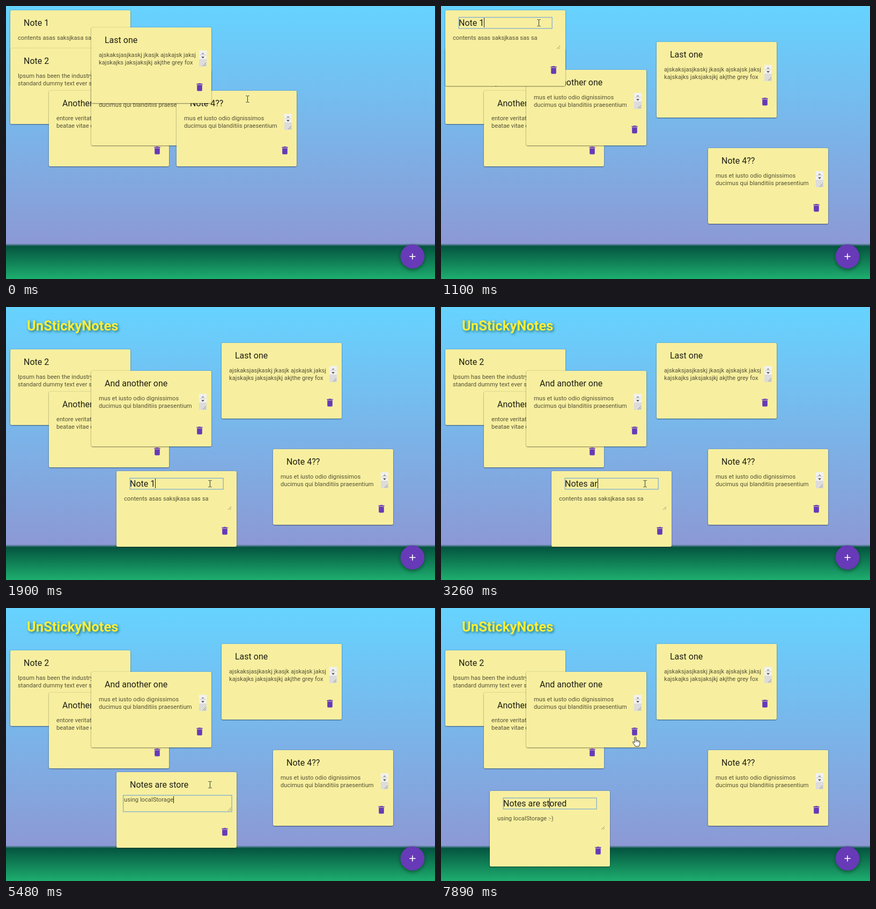
An HTML page with a canvas for the animation above (7990 ms loop, 800 by 509 pixels).

```html
<!DOCTYPE html>
<html lang="en">
<head>
<meta charset="utf-8">
<title>Sticky notes</title>
<style>
html, body { margin: 0; width: 100%; height: 100%; overflow: hidden; }
canvas { display: block; width: 800px; height: 509px; }
</style>
</head>
<body>
<canvas id="stage" width="800" height="509"></canvas>
<script>
const ctx = document.getElementById('stage').getContext('2d');
const LOOP = 7990, W = 224, H = 141;
const PURPLE = '#673ab7', PAPER = '#f7ef9f';
const TITLE_FONT = '16px Roboto, sans-serif';
const BODY_FONT = '11.2px Roboto, sans-serif';
const BIN = new Path2D('M6 19c0 1.1.9 2 2 2h8c1.1 0 2-.9 2-2V7H6v12zM19 4h-3.5l-1-1h-5l-1 1H5v2h14V4z');
const ARROW = new Path2D('M0 0V16L3.7 12.5L6.2 18L8.6 17L6.2 11.6H11.3Z');
const HAND = new Path2D('M4 1.4C4 .1 6.6.1 6.6 1.4V6.6C7.2 5.9 9 6.1 9.1 7.3C9.8 6.6 11.4 6.9 11.5 8.1C12.5 7.5 13.8 8 13.8 9.2V12.5C13.8 14.4 12.4 15.4 12.2 18H5.3C5 16 2.4 13.6.9 11.1C.1 9.6 1.6 8.8 2.5 9.7L4 11.2Z');

// Latest entry whose time has come.
function held(keys, t) {
  let value = keys[0][1];
  for (const [time, v] of keys) if (time <= t) value = v;
  return value;
}

// Eased position between [time, x, y] keys.
function glide(keys, t) {
  let a = keys[0];
  for (const b of keys) {
    if (b[0] > t) {
      if (b === a) break;
      const p = (t - a[0]) / (b[0] - a[0]), e = p * p * (3 - 2 * p);
      return [a[1] + (b[1] - a[1]) * e, a[2] + (b[2] - a[2]) * e];
    }
    a = b;
  }
  return [a[1], a[2]];
}

const typing = (text, start, lengths) =>
  lengths.map((n, i) => [start + i * 100, text.slice(0, n)]);

const HEADING = 'Notes are stored', MESSAGE = 'using localStorage :-)';

const first = {
  path: [[1100, 8, 8], [1600, 202, 309], [1700, 206, 306], [7090, 206, 306], [7490, 88, 349], [7590, 91, 341]],
  title: [
    [0, 'Note 1'], [2100, 'Note '], [2200, 'Note'], [2300, 'Not'], [2420, 'No'], [2520, 'N'],
    ...typing(HEADING, 2720, [2, 3, 4, 5]),
    ...typing(HEADING, 3160, [7, 8, 9, 11]),
    ...typing(HEADING, 3660, [12, 13, 15]),
    [6090, HEADING]
  ],
  body: [
    [0, 'contents asas saksjkasa sas sa'],
    ...typing(MESSAGE, 4380, [1, 3, 5, 7, 9, 11, 12, 14]),
    ...typing(MESSAGE, 5280, [15, 16, 18]),
    ...typing(MESSAGE, 6590, [20, 21, 22])
  ],
  raised: 1100
};

const fixed = (path, title, body, raised) =>
  ({ path, title: [[0, title]], body: [[0, body]], raised, scroll: true });

const fourth = fixed([[0, 318, 158], [300, 507, 274], [400, 498, 265]],
  'Note 4??', 'mus et iusto odio dignissimos\nducimus qui blanditiis praesentium', 100);
const last = fixed([[500, 159, 40], [800, 402, 67]],
  'Last one', 'ajskaksjasjkaskj jkasjk ajskajsk jaksj\nkajskajks jaksjaksjkj akjthe grey fox', 500);
const notes = [
  first,
  fixed([[0, 8, 79]], 'Note 2', 'Ipsum has been the industry\'s\nstandard dummy text ever since'),
  fixed([[0, 80, 158]], 'Another one', 'entore veritatis et quasi architecto\nbeatae vitae dicta sunt explicabo'),
  fixed([[0, 159, 119]], 'And another one', 'mus et iusto odio dignissimos\nducimus qui blanditiis praesentium'),
  fourth,
  last
];

const focus = [
  [0, {}],
  [100, { note: fourth, field: 'title' }],
  [500, { note: last, field: 'title' }],
  [1100, { note: first, field: 'title' }],
  [4030, { note: first, field: 'body' }],
  [5990, { note: first, field: 'title' }],
  [6190, { note: first, field: 'body' }],
  [7090, { note: first, field: 'title' }]
];

const pointer = [
  [0, 450, 173], [300, 639, 289], [400, 630, 280], [500, 310, 62], [800, 553, 89],
  [1100, 182, 31], [1600, 376, 332], [1700, 380, 329], [6090, 380, 329], [6290, 342, 362],
  [6990, 342, 362], [7090, 319, 329], [7490, 201, 372], [7590, 204, 364], [7790, 346, 244], [7890, 364, 249]
];
const pointerKind = [[0, 'beam'], [900, 'arrow'], [1100, 'beam'], [7690, 'arrow'], [7890, 'hand']];

function rect(x, y, w, h, color) {
  ctx.fillStyle = color;
  ctx.fillRect(x, y, w, h);
}

function text(str, x, y, font, color) {
  ctx.font = font;
  ctx.fillStyle = color;
  ctx.fillText(str, x, y);
}

function widthOf(str, font) {
  ctx.font = font;
  return ctx.measureText(str).width;
}

function shadow(color, blur, dx, dy) {
  ctx.shadowColor = color;
  ctx.shadowBlur = blur;
  ctx.shadowOffsetX = dx;
  ctx.shadowOffsetY = dy;
}
const noShadow = () => shadow('transparent', 0, 0, 0);

function line(color, width, ...points) {
  ctx.strokeStyle = color;
  ctx.lineWidth = width;
  ctx.beginPath();
  for (let i = 0; i < points.length; i += 4) {
    ctx.moveTo(points[i], points[i + 1]);
    ctx.lineTo(points[i + 2], points[i + 3]);
  }
  ctx.stroke();
}

function triangle(x, y, dy, color) {
  ctx.fillStyle = color;
  ctx.beginPath();
  ctx.moveTo(x - 3, y);
  ctx.lineTo(x + 3, y);
  ctx.lineTo(x, y + dy);
  ctx.fill();
}

function background() {
  const g = ctx.createLinearGradient(0, 0, 0, 509);
  g.addColorStop(0, '#66d3ff');
  g.addColorStop(0.87, '#8c99d5');
  g.addColorStop(0.88, '#04553f');
  g.addColorStop(1, '#1eae6f');
  rect(0, 0, 800, 509, g);

  shadow('rgba(0,80,60,.75)', 5, 2, 2);
  text('UnStickyNotes', 39, 44, 'bold 25.6px Roboto, sans-serif', '#ffee3a');
  noShadow();
}

function addButton() {
  shadow('rgba(0,0,0,.4)', 7, 0, 3);
  ctx.fillStyle = PURPLE;
  ctx.beginPath();
  ctx.arc(758, 467, 22.4, 0, 7);
  ctx.fill();
  noShadow();
  rect(752.4, 466.2, 11.2, 1.6, '#fff');
  rect(757.2, 461.4, 1.6, 11.2, '#fff');
}

function paper() {
  ctx.fillStyle = PAPER;
  ctx.beginPath();
  ctx.roundRect(0, 0, W, H, 3);
  shadow('rgba(0,0,0,.45)', 2, 0, 1);
  ctx.fill();
  shadow('rgba(0,0,0,.25)', 2, 0, 0);
  ctx.fill();
  noShadow();
}

function scroller() {
  rect(201, 43, 14, 16, '#f1f1f1');
  rect(201, 59, 14, 14, '#dcdcdc');
  triangle(208, 50, -3, '#999');
  rect(202, 51, 12, 1, '#d0d0d0');
  triangle(208, 54.5, 3, '#444');
}

function outline(x, y, w, h) {
  ctx.strokeStyle = '#78a9d2';
  ctx.lineWidth = 1.2;
  ctx.strokeRect(x, y, w, h);
}

function caret(x, y, h) {
  rect(x, y, 1, h, '#222');
}

function drawNote(note, t, q) {
  const [x, y] = glide(note.path, q);
  const title = held(note.title, t), body = held(note.body, t);
  const active = held(focus, t);
  const field = active.note === note ? active.field : '';
  const selected = note === first && t >= 4180 && t < 4380;

  ctx.save();
  ctx.translate(Math.round(x), Math.round(y));
  paper();
  text(title, 25, 29, TITLE_FONT, 'rgba(0,0,0,.88)');
  if (selected) rect(14, 44, widthOf(body, BODY_FONT), 14, '#3390ff');
  body.split('\n').forEach((row, i) =>
    text(row, 14, 55 + i * 13.5, BODY_FONT, selected ? '#fff' : 'rgba(0,0,0,.66)'));

  if (note.scroll) scroller();
  line('#86836a', 0.9, 208, 72, 214, 66, 211.5, 72, 214, 69.5);

  if (field === 'title') {
    outline(25.2, 13.2, 174, 20.6);
    const before = t >= 7090 ? 'Notes are st' : title;
    caret(Math.round(25 + widthOf(before, TITLE_FONT)), 14, 18);
  }
  if (field === 'body') {
    outline(12.7, 43.2, 202.4, 30.6);
    const blink = t >= 5790 && t < 5990;
    if (!selected && !blink) caret(Math.round(14 + widthOf(body, BODY_FONT)), 45, 13);
    if (t >= 6190) {
      const from = 14 + widthOf('using ', BODY_FONT);
      ctx.setLineDash([2, 1]);
      line('rgba(120,60,40,.85)', 1, from, 57.5, from + widthOf('localStorage', BODY_FONT), 57.5);
      ctx.setLineDash([]);
    }
  }

  ctx.translate(192.4, 101.6);
  ctx.scale(0.8, 0.8);
  ctx.fillStyle = PURPLE;
  ctx.fill(BIN);
  ctx.restore();
}

function drawPointer(q) {
  const [x, y] = glide(pointer, q).map(Math.round);
  const kind = held(pointerKind, q);
  ctx.save();
  ctx.translate(x, y);
  if (kind === 'beam') {
    line('#333', 1, 0.5, -5, 0.5, 6, -2.5, -5.5, 0, -5.5, 1, -5.5, 3.5, -5.5, -2.5, 6.5, 0, 6.5, 1, 6.5, 3.5, 6.5);
  } else {
    const shape = kind === 'hand' ? HAND : ARROW;
    if (kind === 'hand') ctx.translate(-7, -9);
    ctx.fillStyle = '#fff';
    ctx.strokeStyle = '#222';
    ctx.lineWidth = 1;
    ctx.fill(shape);
    ctx.stroke(shape);
    if (kind === 'hand') line('#222', 0.8, 6.6, 6.6, 6.6, 10, 9.1, 7.3, 9.1, 10.3, 11.5, 8.1, 11.5, 10.6);
  }
  ctx.restore();
}

function draw(t) {
  // Dragging advances in tenths of a second.
  const shift = t < 4000 ? 0 : 90;
  const q = Math.floor((t - shift) / 100) * 100 + shift;
  const level = n => n.raised <= t ? n.raised : 0;

  background();
  [...notes].sort((a, b) => level(a) - level(b)).forEach(n => drawNote(n, t, q));
  addButton();
  drawPointer(q);
}

let start;
function tick(now) {
  start ??= now;
  draw((now - start) % LOOP);
  requestAnimationFrame(tick);
}
draw(0);
requestAnimationFrame(tick);
</script>
</body>
</html>
```
